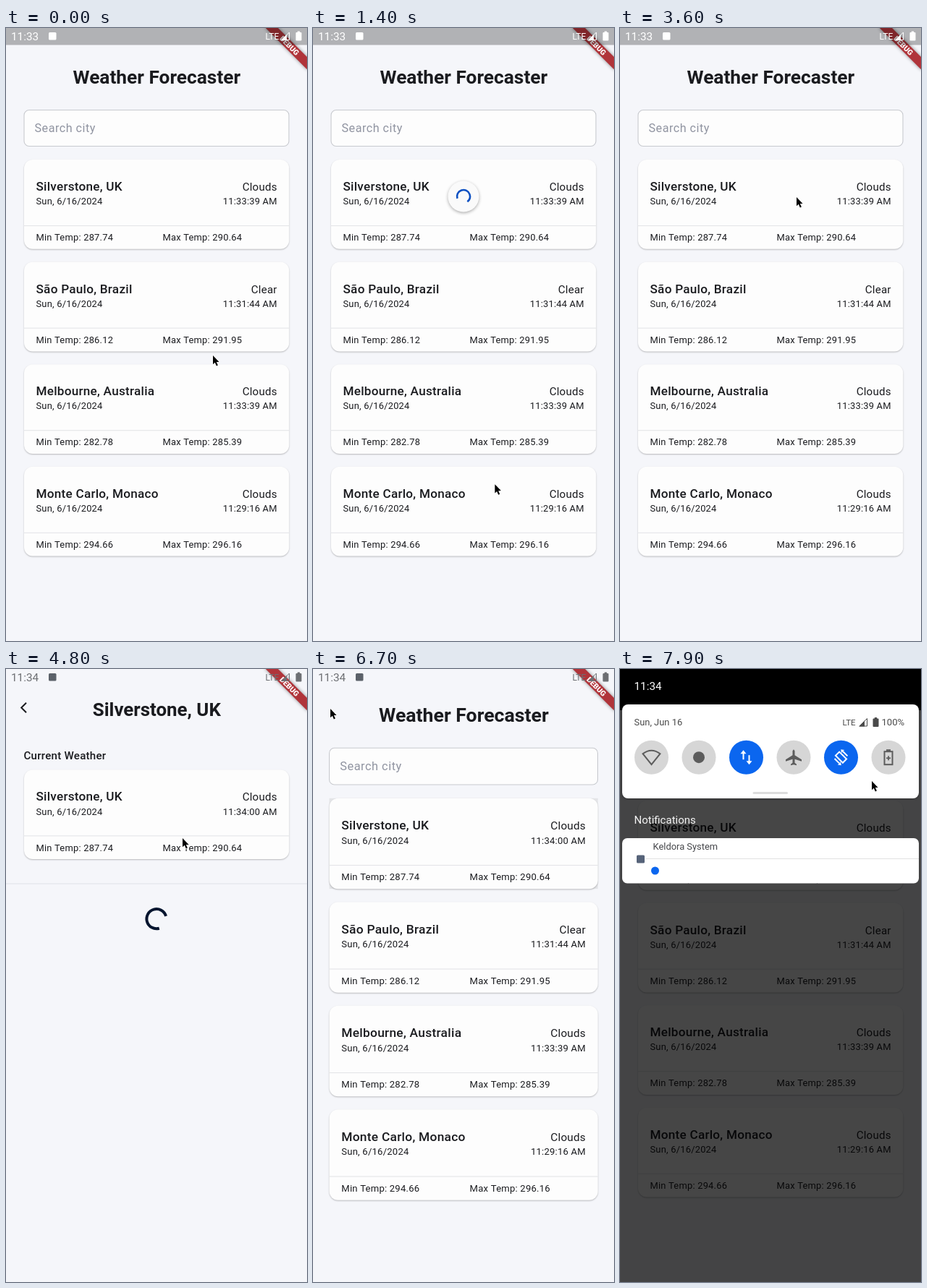
These frames come from a looping animation (416 by 848 pixels, 8000 ms). An HTML page with a canvas:

```html
<!DOCTYPE html>
<html lang="en">
<head>
<meta charset="utf-8">
<title>Weather Forecaster</title>
<style>
html, body { margin: 0; width: 100%; height: 100%; overflow: hidden; background: #f5f6fa; }
canvas { display: block; width: 416px; height: 848px; }
</style>
</head>
<body>
<canvas id="stage"></canvas>
<script>
const W = 416, H = 848, LOOP = 8000, STEP = 100;
const BG = '#f5f6fa', INK = '#1a1b1f', PAPER = '#fdfdfd', BLUE = '#0b66ef';
const canvas = document.getElementById('stage');
const c = canvas.getContext('2d');
const dpr = window.devicePixelRatio || 1;
canvas.width = W * dpr;
canvas.height = H * dpr;

const cities = [
  ['Silverstone, UK', 'Clouds', '11:33:39 AM', '287.74', '290.64'],
  ['São Paulo, Brazil', 'Clear', '11:31:44 AM', '286.12', '291.95'],
  ['Melbourne, Australia', 'Clouds', '11:33:39 AM', '282.78', '285.39'],
  ['Monte Carlo, Monaco', 'Clouds', '11:29:16 AM', '294.66', '296.16']
];

// Cursor stops: time, x, y
const cursorPath = [
  [700, 286, 453], [1000, 245, 651], [1300, 245, 651], [1800, 306, 460],
  [2900, 306, 460], [3600, 244, 234], [5300, 244, 234], [6200, 24, 55],
  [6700, 24, 55], [7400, 352, 8], [7500, 352, 8], [7700, 351, 73], [7900, 348, 155]
];
const pullPath = [[700, 0], [800, 0.3], [900, 1], [1000, 1.54], [1200, 1.54], [1400, 1]];
const stretchPath = [[700, 0], [1000, 1], [1200, 1], [1400, 0]];

const clamp = v => Math.max(0, Math.min(1, v));
const ramp = (t, a, b) => clamp((t - a) / (b - a));
const frac = v => v - Math.floor(v);
const rad = d => d * Math.PI / 180;

// Standard material curve: cubic-bezier(.4, 0, .2, 1)
function ease(x) {
  let lo = 0, hi = 1, s = 0.5;
  for (let i = 0; i < 18; i++) {
    s = (lo + hi) / 2;
    const bx = 1.2 * s * (1 - s) ** 2 + 0.6 * s * s * (1 - s) + s ** 3;
    if (bx < x) lo = s; else hi = s;
  }
  return 3 * s * s * (1 - s) + s ** 3;
}

function track(t, keys, col = 1) {
  if (t <= keys[0][0]) return keys[0][col];
  for (let i = 1; i < keys.length; i++) {
    const a = keys[i - 1], b = keys[i];
    if (t <= b[0]) {
      const u = ramp(t, a[0], b[0]);
      return a[col] + (b[col] - a[col]) * u * u * (3 - 2 * u);
    }
  }
  return keys[keys.length - 1][col];
}

function text(str, x, y, size, color = INK, { weight = 400, gap = 0, align = 'left' } = {}) {
  c.font = `${weight} ${size}px Roboto, sans-serif`;
  c.letterSpacing = gap + 'px';
  c.textAlign = align;
  c.fillStyle = color;
  c.fillText(str, x, y);
}

function box(x, y, w, h, r, color) {
  c.beginPath();
  c.roundRect(x, y, w, h, r);
  c.fillStyle = color;
  c.fill();
}

function disc(x, y, r, color) {
  c.beginPath();
  c.arc(x, y, r, 0, Math.PI * 2);
  c.fillStyle = color;
  c.fill();
}

function poly(points, color) {
  c.beginPath();
  points.forEach(p => c.lineTo(p[0], p[1]));
  c.closePath();
  c.fillStyle = color;
  c.fill();
}

function line(points, color, width) {
  c.beginPath();
  points.forEach(p => c.lineTo(p[0], p[1]));
  c.strokeStyle = color;
  c.lineWidth = width;
  c.stroke();
}

function shadow(color, blur, dy) {
  c.shadowColor = color;
  c.shadowBlur = blur * dpr;
  c.shadowOffsetY = dy * dpr;
}

function at(x, y, draw) {
  c.save();
  c.translate(x, y);
  draw();
  c.restore();
}

function card(y, [name, sky, time, min, max]) {
  c.save();
  shadow('rgba(0,0,0,0.25)', 2, 1);
  box(25, y, 366.3, 123.8, 12, PAPER);
  c.restore();
  const small = { gap: 0.22 }, right = { gap: 0.22, align: 'right' };
  text(name, 41.5, y + 43, 17.15, INK, { weight: 500, gap: 0.25 });
  text(sky, 374.7, y + 43, 15.1, INK, right);
  text('Sun, 6/16/2024', 41.5, y + 62.2, 12.9, INK, small);
  text(time, 374.7, y + 62.2, 12.9, INK, right);
  c.fillStyle = '#e4e5e8';
  c.fillRect(25, y + 91, 366.3, 1.1);
  text('Min Temp: ' + min, 41.5, y + 112.2, 12.9, INK, small);
  text('Max Temp: ' + max, 216.5, y + 112.2, 12.9, INK, small);
}

// Indeterminate ring: p drives the sweep, r the rotation
function ring(x, y, radius, width, color, p, r) {
  p = frac(p);
  const head = ease(clamp(p * 2)), tail = ease(clamp(p * 2 - 1));
  const start = rad(-90 + tail * 270 + frac(r) * 360 + p * 90);
  c.beginPath();
  c.arc(x, y, radius, start, start + Math.max(0.03, rad(270 * (head - tail))));
  c.strokeStyle = color;
  c.lineWidth = width;
  c.stroke();
}

function refresher(t) {
  if (t < 800 || t >= 2500) return;
  const f = track(t, pullPath), y = 143 + 90 * f, blue = '#0d50c2';
  c.save();
  c.beginPath();
  c.rect(0, 168, W, H);
  c.clip();
  c.translate(208, y);
  const s = 1 - 0.5 * ramp(t, 2300, 2400);
  c.scale(s, s);
  c.save();
  shadow('rgba(0,0,0,0.32)', 4, 1.5);
  disc(0, 0, 21.5, '#fafafa');
  c.restore();
  if (t < 1300) {
    const k = Math.min(1, f / 1.5), end = rad(125 - 150 * (1 - k));
    c.globalAlpha = 0.3 + 0.7 * k;
    c.beginPath();
    c.arc(0, 0, 9, end - rad(295 * k), end);
    c.strokeStyle = blue;
    c.lineWidth = 2.5;
    c.stroke();
    c.rotate(end);
    poly([[4.5, 0], [13.5, 0], [9, 5]], blue);
  } else {
    ring(0, 0, 9, 2.6, blue, (t - 2300) / 1333 + 0.25, (t - 2300) / 2222 + 0.91);
  }
  c.restore();
}

function ripple(y, x0, y0, r) {
  c.save();
  c.beginPath();
  c.roundRect(25, y, 366.3, 123.8, 12);
  c.clip();
  disc(x0, y0, r, 'rgba(0,0,0,0.06)');
  c.restore();
}

function home(t, popping) {
  text('Weather Forecaster', 208.3, 77.3, 26.3, INK, { weight: 700, align: 'center' });
  box(25, 113.5, 366, 50, 7, PAPER);
  c.strokeStyle = '#c8cacf';
  c.lineWidth = 1.1;
  c.stroke();
  text('Search city', 39.5, 144.2, 16.15, '#9094a1', { gap: 0.5 });
  if (popping) {
    c.fillStyle = '#e4e5e8';
    c.fillRect(25, 182, 366.3, 123.8);
  }
  c.save();
  c.translate(0, 170);
  c.scale(1, 1 + 0.0065 * track(t, stretchPath));
  c.translate(0, -170);
  cities.forEach((city, i) => {
    const row = city.slice();
    if (i === 0 && t >= 4400) row[2] = '11:34:00 AM';
    card(182 + i * 141.6, row);
  });
  c.restore();
  if (t >= 4300 && t < 4700) ripple(182, 244, 233, 60 + (t - 4300) * 0.7);
  refresher(t);
}

function detail(t) {
  c.fillStyle = BG;
  c.fillRect(0, 0, W, H);
  line([[28, 46.8], [21.2, 53.5], [28, 60.2]], INK, 2);
  text('Silverstone, UK', 208.3, 65.2, 25.9, INK, { weight: 700, align: 'center' });
  text('Current Weather', 24.5, 124.7, 15.1, INK, { weight: 500, gap: 0.25 });
  const row = cities[0].slice();
  row[2] = '11:34:00 AM';
  card(139.3, row);
  c.fillStyle = '#e2e4e9';
  c.fillRect(0, 296.5, W, 1.1);
  // The ring rests for a moment while the page is busy
  const busy = Math.min(t, 5100) + Math.max(0, Math.min(t, 6200) - 5300) - 4800;
  ring(208, 345.7, 13.6, 4, '#06152f', busy / 1333 + 0.5, busy / 2222 + 0.33);
}

function scaled(s, draw) {
  c.save();
  c.translate(W / 2, H / 2);
  c.scale(s, s);
  c.translate(-W / 2, -H / 2);
  draw();
  c.restore();
}

function pages(t) {
  c.fillStyle = BG;
  c.fillRect(0, 0, W, H);
  const push = ramp(t, 4350, 4650), pop = ramp(t, 6560, 6860);
  const popping = pop > 0 && pop < 1;
  const away = pop > 0 ? 1 - ease(pop) : ease(push);
  const alpha = pop > 0 ? 1 - ramp(pop, 0.08, 0.3) : ramp(push, 0.1, 0.4);
  if (alpha < 1) scaled(1 + 0.05 * away, () => home(t, popping));
  if (alpha > 0) {
    c.globalAlpha = alpha;
    scaled(pop > 0 ? 1 : 0.85 + 0.15 * away, () => detail(t));
    c.globalAlpha = 1;
  }
}

function banner() {
  c.save();
  c.translate(W, 0);
  c.rotate(Math.PI / 4);
  c.save();
  shadow('rgba(0,0,0,0.45)', 5, 0);
  c.fillStyle = '#b0343a';
  c.fillRect(-41, 28.3, 82, 12.1);
  c.restore();
  text('DEBUG', 0, 38, 10.3, '#fff', { weight: 900, align: 'center' });
  c.restore();
}

function signal(x, y, color) {
  line([[x + 1, y + 11.5], [x + 11.5, y + 1], [x + 11.5, y + 11.5], [x + 1, y + 11.5]], color, 1);
  poly([[x, y + 12], [x + 8, y + 4], [x + 8, y + 12]], color);
}

function battery(x, y, color) {
  box(x, y + 1.5, 8, 11.5, 1, color);
  c.fillRect(x + 2.3, y, 3.4, 2);
}

function statusBar(t) {
  const dark = t >= 4400;
  if (!dark) {
    c.fillStyle = 'rgba(0,0,0,0.28)';
    c.fillRect(0, 0, W, 23.5);
  }
  const ink = dark ? '#6d6f73' : '#fff';
  text('11:3' + (dark ? 4 : 3), 7, 17, 15.3, ink);
  box(59, 6, 10.5, 10.5, 1.5, dark ? '#5b6169' : '#fff');
  text('LTE', 358.5, 15.5, 12, ink);
  signal(380, 5, ink);
  battery(400.5, 4.5, ink);
}

const icons = [
  () => {
    c.beginPath();
    c.moveTo(0, 10);
    c.lineTo(-12, -5);
    c.quadraticCurveTo(0, -14, 12, -5);
    c.closePath();
    c.strokeStyle = '#5c5c5c';
    c.lineWidth = 2;
    c.stroke();
  },
  () => disc(0, 0, 8, '#5c5c5c'),
  () => {
    for (const s of [-1, 1]) {
      line([[4 * s, -3 * s], [4 * s, 7 * s]], '#fff', 2);
      poly([[4 * s - 4, 5 * s], [4 * s + 4, 5 * s], [4 * s, 10 * s]], '#fff');
    }
  },
  () => poly([[-1.5, -9], [0, -11], [1.5, -9], [1.5, -3], [11, 3], [11, 5.5], [1.5, 2.5],
    [1.5, 7.5], [4, 9.5], [4, 11], [0, 10], [-4, 11], [-4, 9.5], [-1.5, 7.5],
    [-1.5, 2.5], [-11, 5.5], [-11, 3], [-1.5, -3]], '#5c5c5c'),
  () => {
    // Tilted phone with a turning arrow at two corners
    c.strokeStyle = '#fff';
    c.lineWidth = 2;
    c.rotate(Math.PI / 4);
    c.strokeRect(-7, -3.7, 14, 7.4);
    for (const s of [-1, 1]) {
      line([[-5 * s, 7.6 * s], [4 * s, 7.6 * s]], '#fff', 2);
      poly([[4 * s, 4.8 * s], [4 * s, 10.4 * s], [8 * s, 7.6 * s]], '#fff');
    }
  },
  () => {
    c.strokeStyle = '#5c5c5c';
    c.lineWidth = 2;
    c.strokeRect(-5.5, -8, 11, 18);
    c.fillStyle = '#5c5c5c';
    c.fillRect(-3, -11, 6, 3);
    c.fillRect(-3, 0.2, 6, 1.8);
    c.fillRect(-0.9, -1.9, 1.8, 6);
  }
];

function shade(t) {
  if (t < 7600) return;
  const k = ramp(t, 7700, 7900);
  const bottom = t < 7700 ? 12 : 27 + 152 * k, top = bottom - 130;
  c.fillStyle = `rgba(0,0,0,${0.72 * k})`;
  c.fillRect(0, 0, W, H);
  c.fillStyle = `rgba(0,0,0,${k})`;
  c.fillRect(0, 0, W, Math.max(0, top + 8));

  c.save();
  c.globalAlpha = k;
  text('11:34', 19.5, 29.3, 15.3, '#fff');
  text('Notifications', 19.5, bottom + 35, 15, '#f4f4f4');
  at(0, bottom, () => {
    box(3, 55, 410, 62.5, 7, '#fff');
    c.fillStyle = '#e2e2e2';
    c.fillRect(36, 83, 377, 1);
    text('Keldora System', 45.5, 71, 12.9, '#46474b');
    box(23, 78.5, 11, 11, 1.5, '#566379');
    disc(48.5, 100, 5.5, BLUE);
  });
  c.restore();

  c.save();
  shadow('rgba(0,0,0,0.3)', 3, 1);
  box(3, top, 410, 130, 8, '#fff');
  c.restore();

  if (k < 1) {
    c.globalAlpha = 1 - k;
    box(59, 6, 10.5, 10.5, 1.5, '#5b6b7b');
    disc(88, 11, 5.5, BLUE);
  }
  c.globalAlpha = k;
  at(0, top, () => {
    text('Sun, Jun 16', 19.5, 29.3, 12.9, '#4a4a4a');
    text('LTE', 307.5, 29.3, 11.5, '#4a4a4a');
    signal(330, 18.5, '#4a4a4a');
    battery(349.5, 18, '#4a4a4a');
    text('100%', 361.5, 29.3, 13.1, '#4a4a4a');
    icons.forEach((icon, i) => at(43.5 + i * 65.5, 73.2, () => {
      disc(0, 0, 23.5, i === 2 || i === 4 ? BLUE : '#d6d6d6');
      icon();
    }));
    box(183.5, 121, 48.5, 3, 1.5, '#dcdcdc');
  });
  c.globalAlpha = 1;
}

function cursor(t) {
  at(track(t, cursorPath, 1), track(t, cursorPath, 2), () => {
    c.scale(0.93, 0.93);
    c.lineJoin = 'round';
    const arrow = [[0, 0], [0, 13.2], [3, 10.5], [5.2, 15.6], [7.4, 14.6], [5.2, 9.8], [9.2, 9.6]];
    line(arrow.concat([arrow[0]]), '#fff', 1.8);
    poly(arrow, '#000');
  });
}

function frame(now) {
  const t = Math.floor((now % LOOP) / STEP) * STEP;
  c.setTransform(dpr, 0, 0, dpr, 0, 0);
  c.globalAlpha = 1;
  c.lineJoin = 'miter';
  pages(t);
  banner();
  statusBar(t);
  shade(t);
  cursor(t);
}

const begin = performance.now();
function tick() {
  frame(performance.now() - begin);
  requestAnimationFrame(tick);
}
tick();
</script>
</body>
</html>
```
